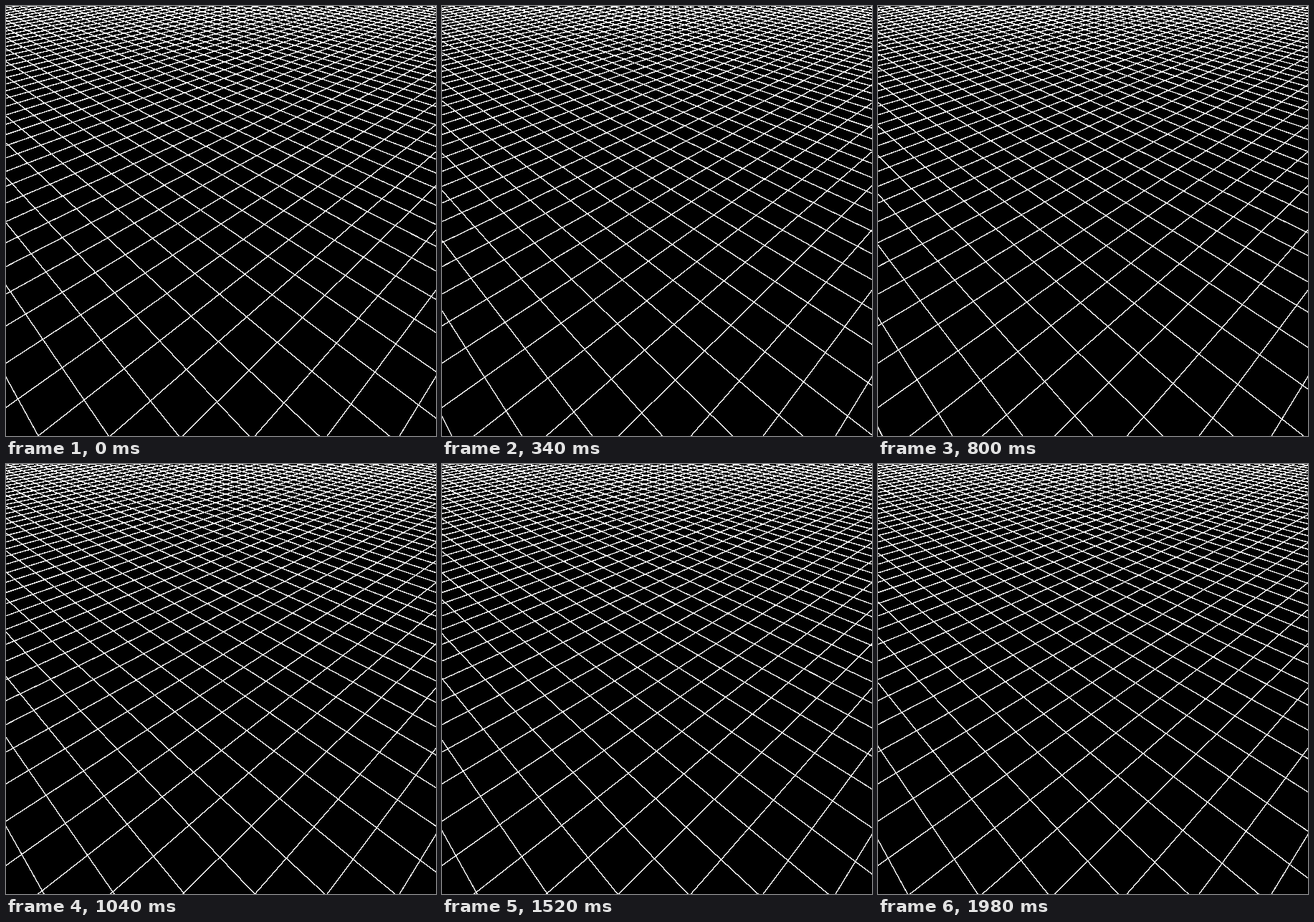
These frames come from a looping animation (600x600 px, 2000 ms). An HTML page with a canvas:

```html
<!DOCTYPE html>
<html lang="en">
<head>
<meta charset="utf-8">
<title>Receding grid</title>
<style>
  html, body { margin: 0; width: 100%; height: 100%; overflow: hidden; background: #000; }
  canvas { display: block; }
</style>
</head>
<body>
<canvas id="stage" width="600" height="600"></canvas>
<script>
const SIZE = 600, CELL_TIME = 500, STEP = 20, LINE_WIDTH = 1.4;
const ctx = document.getElementById('stage').getContext('2d');
const image = ctx.createImageData(SIZE, SIZE);
const pixels = new Uint32Array(image.data.buffer);

// Tilted ground plane seen with a 60 degree field of view.
const horizon = -157, cell = 0.0952, turn = 0.8;
const focal = SIZE / 2 / Math.tan(Math.PI / 6);
const reach = Math.hypot(focal, SIZE / 2 - horizon);
const origin = [294.5, 552.5, 1];

// Homogeneous step of one cell along a ground direction.
function cellStep(angle) {
  const w = cell * Math.cos(angle);
  return [w * (SIZE / 2 + reach * Math.tan(angle)), w * horizon, w];
}
const right = cellStep(turn), left = cellStep(turn - Math.PI / 2);

const move = (p, d, n) => p.map((v, i) => v + d[i] * n);
const cross = (p, q) => [
  p[1] * q[2] - p[2] * q[1],
  p[2] * q[0] - p[0] * q[2],
  p[0] * q[1] - p[1] * q[0]
];

// Hard-edged line ax + by + c = 0: fills the pixels whose centres it covers.
function drawLine([a, b, c]) {
  const shallow = Math.abs(a) < Math.abs(b);
  const [along, across] = shallow ? [a, b] : [b, a];
  const half = LINE_WIDTH / 2 * Math.hypot(a, b) / Math.abs(across);
  for (let i = 0; i < SIZE; i++) {
    const mid = -(along * (i + 0.5) + c) / across - 0.5;
    const end = Math.min(SIZE, mid + half);
    for (let n = Math.max(0, Math.ceil(mid - half)); n < end; n++) {
      pixels[shallow ? n * SIZE + i : i * SIZE + n] = 0xffffffff;
    }
  }
}

function draw(time) {
  const phase = Math.floor(time / STEP) * STEP % CELL_TIME / CELL_TIME;
  pixels.fill(0xff000000);
  for (let k = -12; k <= 52; k++) {
    drawLine(cross(move(origin, right, k + phase), left));
    drawLine(cross(move(origin, left, k), right));
  }
  ctx.putImageData(image, 0, 0);
}

const start = performance.now();
function tick() {
  draw((performance.now() - start) % 2000);
  requestAnimationFrame(tick);
}
tick();
</script>
</body>
</html>
```
